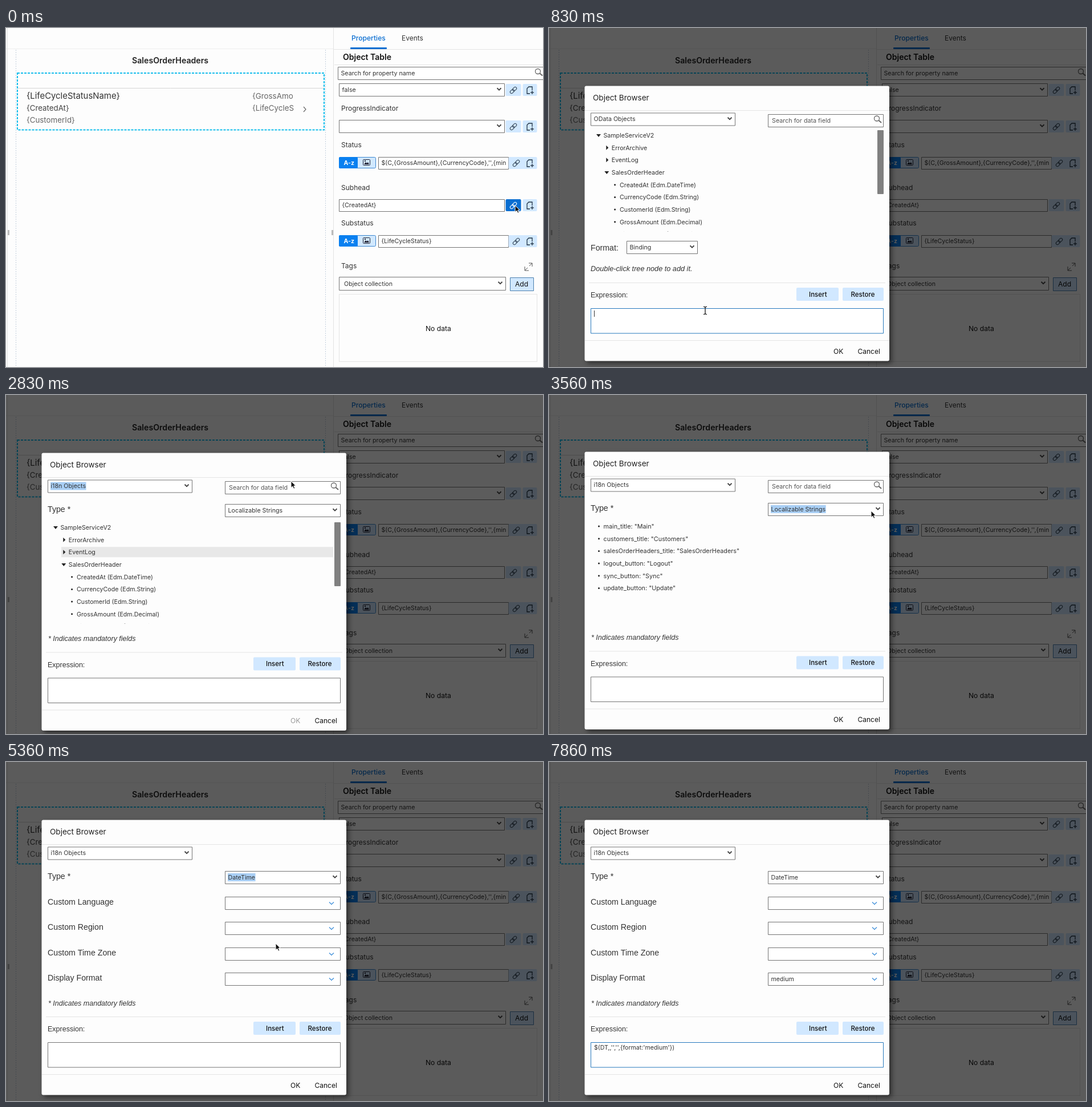
An HTML page with a canvas that plays this animation: 942 by 594 pixels, repeating every 7960 ms.

```html
<!DOCTYPE html>
<html lang="en">
<head>
<meta charset="utf-8">
<title>Object Browser</title>
<style>
html, body { margin: 0; width: 942px; height: 594px; overflow: hidden; background: #fdfdfd; }
canvas { display: block; }
</style>
</head>
<body>
<canvas id="stage" width="942" height="594"></canvas>
<script>
const c = document.getElementById('stage').getContext('2d');
const LOOP = 7960, UI = 'Inter, sans-serif', ARIAL = '"Liberation Sans", Arial, sans-serif';
const INK = '#333', LIGHT = '#d1e8ff', BLUE = '#0a6ed1', LINE = '#e4e4e4', MARK = '#a9cff5';

// Text is placed by the vertical centre of its capitals.
function text(s, x, y, size = 10.7, color = INK, style = '', family = UI) {
  c.font = `${style} ${size}px ${family}`;
  c.fillStyle = color;
  c.fillText(s, x, y + size * .36);
}
const label = (s, x, y, size = 14.2, style = '') => text(s, x, y, size, INK, style, ARIAL);

function box(x, y, w, h, fill, stroke, r = 0) {
  c.beginPath();
  c.roundRect(x, y, w, h, r);
  if (fill) { c.fillStyle = fill; c.fill(); }
  if (stroke) { c.strokeStyle = stroke; c.lineWidth = 1; c.stroke(); }
}

function path(points, color, width = 1, fill) {
  c.beginPath();
  for (let i = 0; i < points.length; i += 2) c.lineTo(points[i], points[i + 1]);
  if (fill) { c.closePath(); c.fillStyle = fill; c.fill(); }
  if (color) { c.strokeStyle = color; c.lineWidth = width; c.stroke(); }
}

function at(x, y, draw, angle = 0) {
  c.save();
  c.translate(x, y);
  c.rotate(angle);
  draw();
  c.restore();
}

const chevron = (x, y, color = '#444', w = 1.8, r = 3.5) => path([x - r, y - r / 2, x, y + r / 2, x + r, y - r / 2], color, w);

function field(x, y, w, h, value = '', marked = false, stroke = '#747474') {
  box(x + .5, y + .5, w, h, '#fff', stroke);
  c.font = `10.7px ${UI}`;
  if (marked) box(x + 5, y + 4, c.measureText(value).width + 1, h - 8, MARK);
  c.save();
  c.beginPath();
  c.rect(x, y, w - 3, h);
  c.clip();
  text(value, x + 5.5, y + h / 2);
  c.restore();
}

function select(x, y, w, h, value, marked) {
  field(x, y, w, h, value, marked);
  chevron(x + w - 9, y + h / 2 - 1);
}

function combo(y, value) {
  field(384, y, 202, 22, value);
  chevron(571, y + 11.5, '#2f86d6', 1.1, 4);
}

function lens(x, y) {
  c.beginPath();
  c.arc(x, y, 4.5, 0, 7);
  c.strokeStyle = '#666';
  c.lineWidth = 1.3;
  c.stroke();
  path([x + 3.2, y + 3.2, x + 8, y + 7.5], '#666', 2);
}

function linkIcon(x, y, on) {
  box(x - 13.5, y - 11, 27, 21, on ? BLUE : LIGHT, null, 2);
  at(x, y, () => {
    const color = on ? '#fff' : '#345';
    box(-7, -2.5, 8, 5, null, color, 2.5);
    box(-1, -2.5, 8, 5, null, color, 2.5);
  }, -Math.PI / 4);
}

function docIcon(x, y) {
  box(x - 12.5, y - 11, 25, 21, LIGHT, null, 2);
  path([x + 4, y, x + 4, y - 6, x - 2, y - 6, x - 5, y - 3, x - 5, y + 6, x, y + 6], '#234', 1.3);
  path([x + 1, y + 4, x + 7, y + 4], '#234', 1.3);
  path([x + 4, y + 1, x + 4, y + 7], '#234', 1.3);
}

function toggleRow(y, value) {
  box(584.5, y - 9.5, 64, 19, LIGHT, '#3b87cf', 2);
  box(584, y - 10, 33, 20, '#0a80f0', null, 2);
  text('A-z', 592.5, y, 10.5, '#fff', 'bold');
  box(626.5, y - 5.5, 12, 10, null, '#223', 1);
  path([628, y + 3, 631, y - 1, 633, y + 1, 635, y - 1, 637, y + 3], null, 0, '#223');
  box(629, y - 4, 2, 2, '#223');
  field(653, y - 10, 228, 21, value);
  linkIcon(895, y + 1);
  docIcon(919, y + 1);
}

function page(pressed) {
  box(0, 0, 942, 594, '#fdfdfd');
  path([0, 36.5, 574, 36.5], '#ededed');
  for (const x of [2.5, 574.5]) path([x, 0, x, 594], '#e2e2e2');
  c.setLineDash([2, 2]);
  for (const x of [17.5, 560.5]) path([x, 38, x, 594], '#c3cfdd');
  c.setLineDash([]);
  for (const x of [3, 571]) box(x, 354, 3, 9, '#bbb');

  text('SalesOrderHeaders', 221, 57, 14.15, '#222', '600');
  path([20, 105.5, 557, 105.5], '#d5d5d5');
  c.setLineDash([4, 2]);
  c.beginPath();
  c.rect(20, 79, 538, 99.5);
  c.strokeStyle = '#10bdec';
  c.lineWidth = 2;
  c.stroke();
  c.setLineDash([]);
  text('{LifeCycleStatusName}', 36, 119, 14.9, '#333');
  text('{CreatedAt}', 36, 140.5, 13.3, '#444');
  text('{CustomerId}', 36, 161, 13.35, '#666');
  text('{GrossAmo', 432, 119, 13.4, '#666');
  text('{LifeCycleS', 432, 140.5, 13.35, '#666');
  path([522, 138, 526, 142.5, 522, 147], '#666', 1.2);

  text('Properties', 606, 17.5, 12.1, BLUE, '500');
  text('Events', 694, 17.5, 12, '#333');
  path([575, 37.5, 942, 37.5], LINE);
  box(604, 34, 64, 3, BLUE, null, 1);
  text('Object Table', 591, 51, 14, '#111', '600');
  path([576, 64.5, 942, 64.5], LINE);
  field(582, 68, 362, 22, 'Search for property name');
  lens(933, 76);

  select(584, 97, 290, 22, 'false');
  text('ProgressIndicator', 588, 141, 12);
  select(584, 161, 290, 22, '');
  for (const y of [109, 173]) { linkIcon(890, y); docIcon(919, y); }
  text('Status', 588, 205, 12);
  toggleRow(236, "$(C,{GrossAmount},{CurrencyCode},'',{mini");
  text('Subhead', 588, 280, 12);
  field(584, 300, 290, 21, '{CreatedAt}');
  linkIcon(890, 311, pressed);
  docIcon(919, 311);
  text('Substatus', 588, 342, 12);
  toggleRow(373, '{LifeCycleStatus}');

  text('Tags', 588, 417, 12);
  path([917, 412, 923, 412, 923, 418], '#555');
  path([910, 418, 910, 425, 917, 425], '#555');
  path([923, 412, 918, 417], '#555');
  path([910, 425, 915, 420], '#555');
  select(584, 436, 292, 23, '');
  text('Object collection', 593, 448);
  box(884.5, 437.5, 41, 23, LIGHT, '#4b7fae');
  text('Add', 893, 449, 12.1, '#111');
  c.setLineDash([1, 1]);
  box(584.5, 466.5, 347, 118, null, '#ccc');
  c.setLineDash([]);
  text('No data', 736, 526.5, 12.1, '#111');
}

function shadowed(alpha, draw) {
  c.save();
  c.shadowColor = `rgba(0,0,0,${alpha})`;
  c.shadowBlur = 8;
  c.shadowOffsetX = c.shadowOffsetY = 4;
  draw();
  c.restore();
}

function menu(x, y, w, items, chosen, hover, mark = LIGHT, rowH = 16.9, border = '#111') {
  shadowed(.65, () => box(x + .5, y + .5, w, items.length * rowH + 2.5, '#fff', border));
  items.forEach((item, i) => {
    const top = y + 1.5 + i * rowH;
    const fill = i === chosen ? mark : i === hover ? '#eee' : null;
    if (fill) box(x + 1, top, w - 1, rowH, fill);
    text(item, x + 6.5, top + rowH / 2 + .4, 10.75);
  });
}

const bullet = (x, y) => box(x - 1.5, y - 1.5, 3, 3, '#222', null, 1.5);
const tree = ['SampleServiceV2', 'ErrorArchive', 'EventLog', 'SalesOrderHeader', 'CreatedAt (Edm.DateTime)',
  'CurrencyCode (Edm.String)', 'CustomerId (Edm.String)', 'GrossAmount (Edm.Decimal)', 'LifeCycleStatus (Edm.String)'];
const strings = ['main_title: "Main"', 'customers_title: "Customers"', 'salesOrderHeaders_title: "SalesOrderHeaders"',
  'logout_button: "Logout"', 'sync_button: "Sync"', 'update_button: "Update"'];
const sources = ['OData Functions Result', 'OData Objects', 'Control & ClientData', 'Global Data', 'Rules', 'i18n Objects', 'Expressions'];
const types = ['Localizable Strings', 'Number', 'Currency', 'Percentage', 'Scientific Notation', 'DateTime', 'Date', 'Time'];

function drawTree(y0, hovered) {
  c.save();
  c.beginPath();
  c.rect(70, y0 - 10, 504, 179);
  c.clip();
  tree.forEach((name, i) => {
    const y = y0 + i * 21.68, depth = i === 0 ? 0 : i < 4 ? 1 : 2, x = 87 + depth * 14.3;
    if (i === hovered) box(97, y - 9, 478, 18, '#e8e8e8');
    if (depth === 2) bullet(x, y);
    else if (i % 3 === 0) path([x - 4, y - 2, x + 4, y - 2, x, y + 3], null, 0, '#222');
    else path([x - 1, y - 4, x - 1, y + 4, x + 3, y], null, 0, '#222');
    text(name, x + 8.5, y, 10.65);
  });
  c.restore();
  box(576, y0 - 9, 11, 112, '#808080', null, 1);
}

function dialog(t) {
  const i18n = t >= 2400, list = t >= 2950 && t < 4960, dated = t >= 4960, inserted = t >= 7300;
  const extra = i18n && !dated ? 4.5 : 0;
  const focus = t > 480 && t < 1480 || inserted;
  c.save();
  c.globalAlpha = Math.min(1, (t - 30) / 100);
  c.translate(0, list ? -2 : 0);
  shadowed(.5, () => box(62.5, 101.5, 534.5, 482 + extra, '#fdfdfd', null, 3));
  text('Object Browser', 77, 122, 13.55, '#222');
  path([63, 144.5, 597, 144.5], LINE);
  if (!dated) {
    field(384, 151, 202, 22, '');
    text('Search for data field', 391, 162, 10.75, '#555');
    lens(575, 158.5);
  }
  select(73, 148.5, 253, 22, i18n ? 'i18n Objects' : 'OData Objects', t > 1570 && t < 3250);

  if (!i18n) {
    drawTree(188);
    label('Format:', 73, 385);
    select(136, 373, 124, 22, 'Binding');
    label('Double-click tree node to add it.', 73, 421.6, 12.7, 'italic');
  } else {
    label('Type *', 73, 200);
    select(384, 191, 202, 22, dated ? 'DateTime' : 'Localizable Strings', t > 3350 && t < 6000);
    label('* Indicates mandatory fields', 74, 422 + extra, 12.5, 'italic');
    if (dated) {
      ['Custom Language', 'Custom Region', 'Custom Time Zone', 'Display Format'].forEach((name, i) => {
        label(name, 73, 244.5 + i * 44.5);
        combo(Math.round(235.5 + i * 44.5), i === 3 && t >= 6820 ? 'medium' : '');
      });
    } else if (list) {
      strings.forEach((s, i) => { bullet(87.5, 232 + i * 21.7); text(s, 95.5, 232 + i * 21.7, 10.8); });
    } else drawTree(232, 2);
  }

  c.save();
  c.translate(0, extra);
  path([70, 446.5, 590, 446.5], LINE);
  label('Expression:', 73, 467.5, 12.5);
  box(434, 455, 74, 23, LIGHT, null, 2);
  box(515, 455, 72, 23, LIGHT, null, 2);
  text('Insert', 456, 466.5, 11.5, '#111', '500');
  text('Restore', 529.5, 466.5, 11.5, '#111', '500');
  box(73.5, 491.5, 513, 43.5, '#fff', focus ? '#2678bd' : '#747474');
  if (t > 560 && t < 740) box(78, 494, 59, 13, MARK);
  if (t < 740) text('{CreatedAt}', 79, 500.5, 10.5);
  else if (t < 1480) path([79.5, 495, 79.5, 506], '#333');
  if (inserted) text("$(DT,,'','',{format:'medium'})", 79, 500.5, 10.6);
  path([63, 547.5, 597, 547.5], LINE);
  text('OK', 499, 566.5, 12, i18n && !list && !dated ? '#999' : '#111');
  text('Cancel', 541.5, 566.5, 12, '#111');
  c.restore();

  if (t > 1570 && t < 2400) menu(73, 172, 253, sources, 1, -1);
  if (t > 4130 && t < 4960) menu(384, 214, 202, types, 0, t < 4250 ? 0 : t < 4350 ? 2 : t < 4560 ? 4 : 5, MARK);
  if (t > 6200 && t < 6820) menu(384, 393, 202, ['short', 'medium', 'long', 'full'], -1, t > 6500 ? 1 : 0, LIGHT, 25, '#ccc');
  c.restore();
}

// Pointer stops: time, x, y
const stops = [[0, 893, 311], [100, 893, 311], [480, 274, 495], [1050, 274, 495], [1480, 205, 162], [1650, 205, 162],
  [1930, 222, 292], [2220, 160, 268], [2450, 160, 270], [2830, 500, 151], [3260, 565, 203], [4130, 565, 203],
  [4460, 472, 301], [4700, 473, 309], [4960, 473, 309], [5360, 473, 318], [5560, 473, 318], [6100, 571, 381],
  [6250, 571, 381], [6600, 440, 432], [6840, 440, 432], [7200, 471, 467], [LOOP, 471, 467]];

function pointer(t) {
  const i = stops.findIndex(s => s[0] > t), a = stops[i - 1], b = stops[i];
  const u = (t - a[0]) / (b[0] - a[0]), e = u * u * (3 - 2 * u);
  const x = a[1] + (b[1] - a[1]) * e, y = a[2] + (b[2] - a[2]) * e;
  if (t > 440 && y > 491) at(x, y, () => {
    path([0, -6, 0, 6], '#111', 1.3);
    for (const d of [-1, 1]) path([-3, d * 7, 0, d * 6, 3, d * 7], '#111', 1.2);
  });
  else at(x, y, () => path([0, 0, 0, 11.5, 2.8, 9, 4.8, 13.3, 6.8, 12.4, 4.9, 8.2, 8.3, 8], '#fff', 1, '#111'));
}

function frame(now) {
  const t = now % LOOP;
  page(t < 30);
  if (t >= 30) {
    box(0, 0, 942, 594, `rgba(0,0,0,${.64 * Math.min(1, (t - 30) / 100)})`);
    dialog(t);
  }
  if (t < 7430) pointer(t);
}

const start = performance.now();
function loop() {
  frame(performance.now() - start);
  requestAnimationFrame(loop);
}
loop();
</script>
</body>
</html>
```
